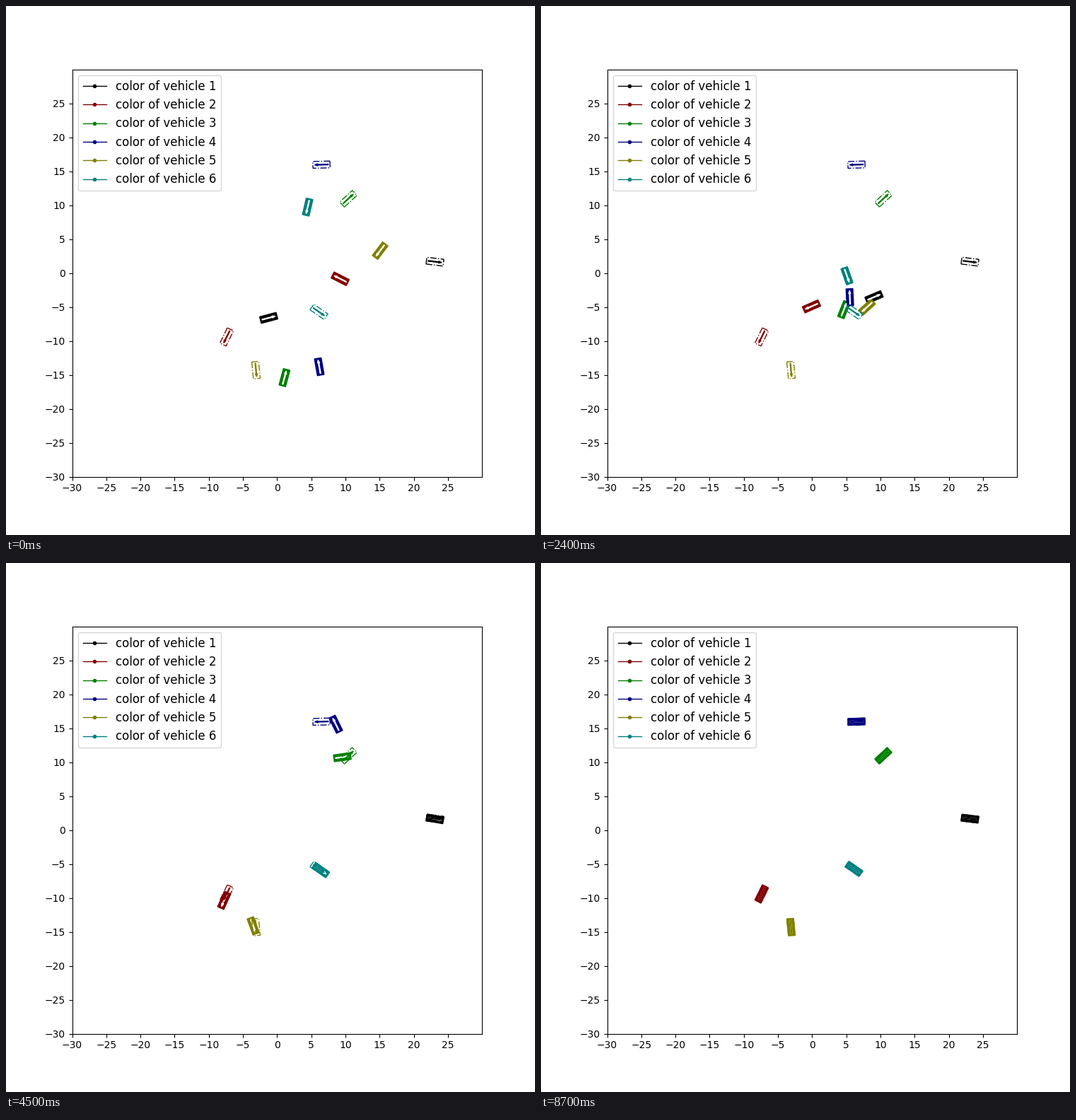
Recreate the animation shown at these times as a matplotlib script. Size 748x748 px, loop 8800 ms.

```python
import numpy as np
import matplotlib.pyplot as plt
from matplotlib.animation import FuncAnimation
from matplotlib.lines import Line2D
from matplotlib.patches import FancyArrow, Rectangle
from matplotlib.transforms import Affine2D

SIZE, DPI = 748, 100
TICKS, STEP_MS = 88, 100
LENGTH, WIDTH = 2.5, 1.0

# Waypoints per vehicle: step, x, y, heading in degrees. The last one is the goal.
ROUTES = {
    "black": [(0, -1.23, -6.59, 15), (15, 3.12, -5.13, 14), (31, 15.80, -1.38, 27),
              (36, 19.37, 0.23, 20), (44, 23.10, 1.66, -10), (52, 24.55, 1.50, -5),
              (54, 24.60, 1.50, -5.5), (63, 23.35, 1.64, -7), (70, 23.10, 1.69, -7)],
    "maroon": [(0, 9.23, -0.83, 153), (8, 8.04, -0.57, 190), (15, 5.14, -1.95, 212),
               (31, -5.11, -7.68, 195), (36, -6.92, -8.46, 208), (44, -7.75, -10.34, 246),
               (46, -7.70, -10.29, 247), (52, -7.44, -9.54, 244), (70, -7.38, -9.40, 244)],
    "green": [(0, 1.08, -15.39, 75), (15, 2.36, -11.00, 72), (31, 7.18, 1.54, 69),
              (36, 8.35, 5.91, 74), (44, 9.54, 10.75, 8), (48, 10.62, 11.13, 28),
              (52, 11.50, 11.79, 44), (54, 11.52, 11.81, 45), (63, 10.73, 11.22, 43.5),
              (70, 10.42, 10.96, 43)],
    "navy": [(0, 6.17, -13.78, 100), (15, 5.50, -9.30, 92), (31, 6.05, 4.11, 88),
             (36, 6.79, 9.61, 77), (44, 8.59, 15.60, 116), (48, 7.11, 16.85, 165),
             (52, 5.61, 16.55, 211), (54, 5.55, 16.38, 203), (63, 5.97, 16.25, 177),
             (70, 6.23, 16.02, 174.5), (80, 6.49, 15.98, 181.5)],
    "olive": [(0, 15.08, 3.31, 233), (15, 12.54, -0.53, 232), (31, 2.84, -9.53, 214),
              (36, 0.17, -11.38, 214), (44, -3.50, -14.09, 290), (52, -3.04, -15.49, 278.5),
              (54, -3.04, -15.50, 278), (63, -3.08, -14.38, 276), (70, -3.09, -14.28, 275.5)],
    "teal": [(0, 4.47, 9.73, 257), (8, 4.45, 8.46, 268), (15, 5.12, 5.23, 277),
             (31, 5.19, -4.95, 305), (36, 5.81, -5.60, 317), (44, 6.38, -5.89, 325),
             (52, 6.12, -5.72, 325), (70, 6.12, -5.70, 325)],
}


def smooth_path(route):
    """Cubic Hermite path through the waypoints, at rest at both ends."""
    knots = np.array(route, float)
    t, p = knots[:, 0], knots[:, 1:]
    h = np.diff(t)[:, None]
    slope = np.diff(p, axis=0) / h
    m = np.zeros_like(p)
    m[1:-1] = (h[1:] * slope[:-1] + h[:-1] * slope[1:]) / (h[1:] + h[:-1])

    k = np.clip(np.arange(TICKS), t[0], t[-1])
    i = np.clip(np.searchsorted(t, k, side="right") - 1, 0, len(t) - 2)
    d = h[i]
    u = (k - t[i])[:, None] / d
    return ((1 + 2 * u) * (1 - u) ** 2 * p[i] + u * (1 - u) ** 2 * d * m[i]
            + u ** 2 * (3 - 2 * u) * p[i + 1] + u ** 2 * (u - 1) * d * m[i + 1])


def place(pose, x, y, heading):
    pose.clear().rotate_deg(heading).translate(x, y)


def add_vehicle(pose, arrow_color, zorder, **body_style):
    trans = pose + ax.transData
    ax.add_patch(Rectangle((-LENGTH / 2, -WIDTH / 2), LENGTH, WIDTH, lw=1,
                           transform=trans, zorder=zorder, **body_style))
    ax.add_patch(FancyArrow(-1, 0, 1.55, 0, width=0.1, lw=1, color=arrow_color,
                            transform=trans, zorder=zorder + 0.1))


fig, ax = plt.subplots(figsize=(SIZE / DPI, SIZE / DPI), dpi=DPI)
ax.set_xlim(-30, 30)
ax.set_ylim(-30, 30)
ax.set_xticks(np.arange(-30, 30, 5))
ax.set_yticks(np.arange(-30, 30, 5))

paths = [smooth_path(route) for route in ROUTES.values()]
poses = [Affine2D() for _ in paths]
for color, pose, path in zip(ROUTES, poses, paths):
    add_vehicle(pose, "white", 1, facecolor=color, edgecolor=color)
    goal = Affine2D()
    place(goal, *path[-1])
    add_vehicle(goal, color, 2, fill=False, edgecolor=color, linestyle="-.")

handles = [Line2D([], [], color=color, marker=".", lw=1, label=f"color of vehicle {n}")
           for n, color in enumerate(ROUTES, 1)]
ax.legend(handles=handles, loc="upper left", fontsize=12)


def update(tick):
    step = max(tick - 1, 0)  # the start pose is held for two ticks
    for pose, path in zip(poses, paths):
        place(pose, *path[step])
    return []


anim = FuncAnimation(fig, update, frames=TICKS, interval=STEP_MS,
                     repeat=True, repeat_delay=0, blit=False)
plt.show()
```
